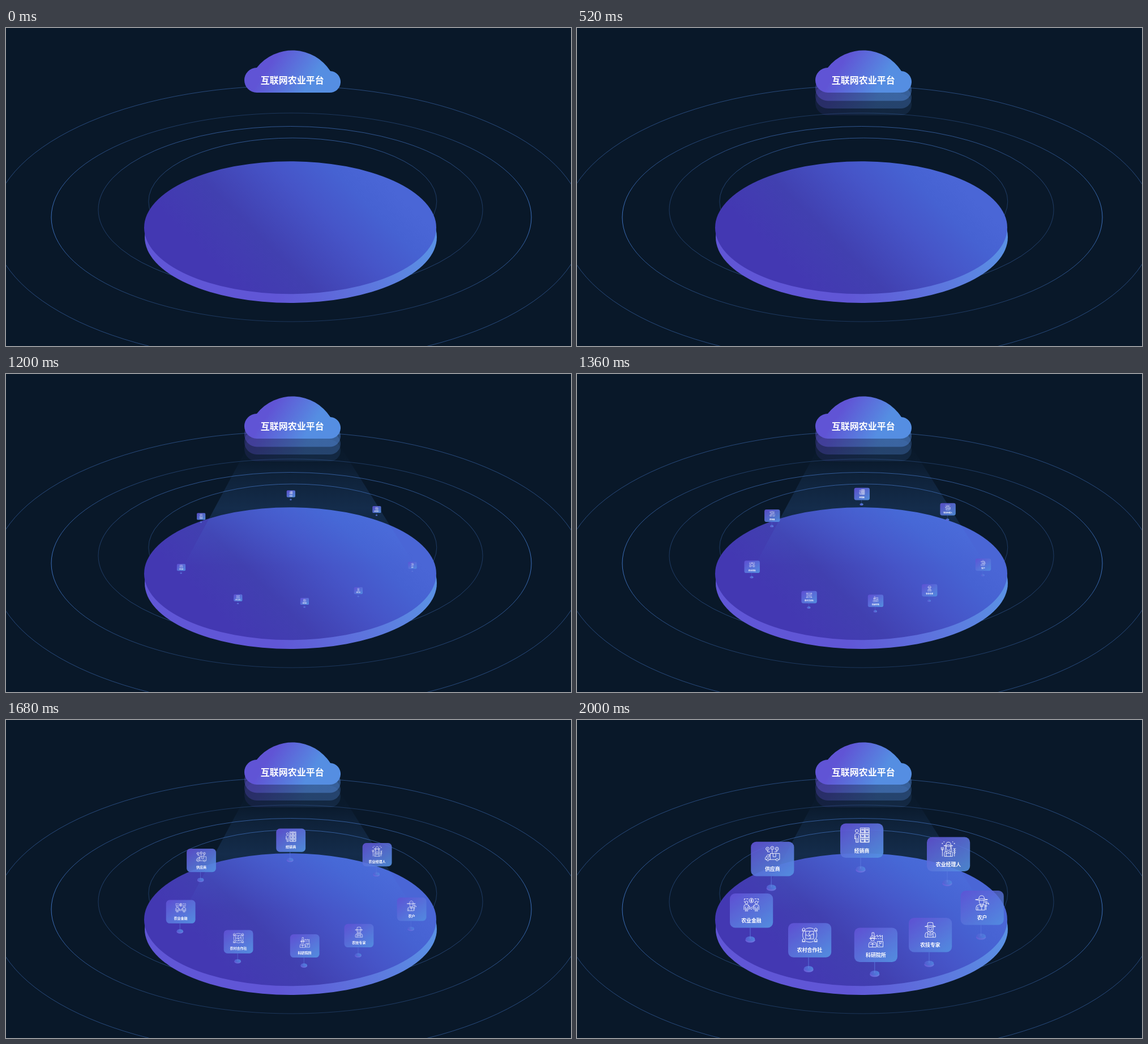
An HTML page for the animation above (2560 ms loop, 998x561 px).

```html
<!DOCTYPE html>
<html lang="zh-CN">
<head>
<meta charset="utf-8">
<title>互联网农业平台</title>
<style>
  html, body { margin: 0; width: 100%; height: 100%; overflow: hidden; background: #091829; }
  svg { display: block; width: 100%; height: 100%; }
  text { font-family: "Noto Sans CJK SC", "Noto Sans CJK", "Noto Sans", sans-serif; fill: #fff; text-anchor: middle; }
  .title { font-size: 16px; font-weight: 700; }
  .label { font-size: 8.9px; font-weight: 700; }
  .ring { fill: none; stroke-width: .8; }
  .icon { fill: none; stroke: #fff; stroke-width: .9; stroke-linecap: round; stroke-linejoin: round; }
</style>
</head>
<body>
<svg viewBox="0 0 998 561">
  <defs>
    <linearGradient id="top" gradientUnits="userSpaceOnUse" x1="402" y1="452" x2="627" y2="227">
      <stop offset="0" stop-color="#4338b2"/>
      <stop offset=".29" stop-color="#4140b0"/>
      <stop offset=".62" stop-color="#4655c8"/>
      <stop offset=".84" stop-color="#4662d2"/>
      <stop offset="1" stop-color="#4a66d6"/>
    </linearGradient>
    <linearGradient id="side" gradientUnits="userSpaceOnUse" x1="480" y1="480" x2="740" y2="370">
      <stop offset="0" stop-color="#6056d6"/>
      <stop offset="1" stop-color="#5a90e4"/>
    </linearGradient>
    <linearGradient id="sky" gradientUnits="userSpaceOnUse" x1="475" y1="50" x2="540" y2="92">
      <stop offset="0" stop-color="#6054d5"/>
      <stop offset="1" stop-color="#558ee2"/>
    </linearGradient>
    <linearGradient id="beamFill" gradientUnits="userSpaceOnUse" x1="0" y1="120" x2="0" y2="340">
      <stop offset="0" stop-color="#4a8ef0" stop-opacity="0"/>
      <stop offset=".15" stop-color="#4a8ef0" stop-opacity=".02"/>
      <stop offset=".27" stop-color="#4a8ef0" stop-opacity=".08"/>
      <stop offset=".53" stop-color="#4a8ef0" stop-opacity=".17"/>
      <stop offset="1" stop-color="#4a8ef0" stop-opacity="0"/>
    </linearGradient>
    <linearGradient id="card" x1=".1" y1=".05" x2=".9" y2=".95">
      <stop offset="0" stop-color="#6055d6"/>
      <stop offset="1" stop-color="#5590e2"/>
    </linearGradient>
    <linearGradient id="pinSide">
      <stop offset="0" stop-color="#6a5fdc"/>
      <stop offset="1" stop-color="#6a80e4"/>
    </linearGradient>
    <linearGradient id="pinTop">
      <stop offset="0" stop-color="#5560d4"/>
      <stop offset="1" stop-color="#5088e0"/>
    </linearGradient>
    <linearGradient id="ringTop" x2="0" y2="1">
      <stop offset="0" stop-color="#4a80d8" stop-opacity=".75"/>
      <stop offset=".5" stop-color="#4a80d8" stop-opacity=".4"/>
      <stop offset="1" stop-color="#4a80d8" stop-opacity=".55"/>
    </linearGradient>
    <linearGradient id="ringMid" x2="0" y2="1">
      <stop offset="0" stop-color="#4a80d8" stop-opacity=".35"/>
      <stop offset=".5" stop-color="#4a88e4" stop-opacity="1"/>
      <stop offset="1" stop-color="#4a80d8" stop-opacity=".35"/>
    </linearGradient>
    <path id="cloud" d="M443 114A22 22 0 0 1 443 70A80 80 0 0 1 573 76A19 19 0 0 1 571 114Z" fill="url(#sky)"/>
  </defs>

  <rect width="998" height="561" fill="#091829"/>
  <ellipse class="ring" cx="498.5" cy="346" rx="522" ry="244" stroke="#4a80d8" stroke-opacity=".6"/>
  <ellipse class="ring" cx="504" cy="334" rx="424" ry="184" stroke="url(#ringMid)"/>
  <ellipse class="ring" cx="502.5" cy="320.5" rx="339.5" ry="147" stroke="url(#ringTop)"/>
  <ellipse class="ring" cx="506.3" cy="306" rx="254.5" ry="112" stroke="url(#ringTop)"/>

  <ellipse cx="503" cy="369" rx="258" ry="116" fill="url(#side)"/>
  <ellipse cx="502" cy="352.2" rx="258" ry="117" fill="url(#top)"/>
  <path id="beam" d="M426 130H592L724 340H313Z" fill="url(#beamFill)"/>

  <use id="low" href="#cloud" y="40" opacity=".12"/>
  <use id="mid" href="#cloud" y="28" opacity=".28"/>
  <use id="high" href="#cloud" y="14.5" opacity=".45"/>
  <use href="#cloud"/>
  <text class="title" x="505.7" y="98.2">互联网农业平台</text>
  <g id="cards"></g>
</svg>
<script>
const LOOP = 2560, STEP = 40, GROW_FROM = 1000, GROW_STEPS = 25;
const reveals = [['high', 200], ['mid', 360], ['low', 520], ['beam', 800]];

const circle = (x, y, r) => `M${x - r} ${y}a${r} ${r} 0 1 0 ${2 * r} 0a${r} ${r} 0 1 0 ${-2 * r} 0`;
const box = (x, y, w, h) => `M${x} ${y}h${w}v${h}h${-w}z`;
const house = (x, y) => `M${x - 3} ${y}l3 -2.4l3 2.4M${x - 2} ${y}v3h4v-3M${x - 3} ${y + 3}h6`;
const person = (x, y) => circle(x, y, 2.6) +
  `M${x - 4.5} ${y + 13}v-6q0 -3 3 -3h3q3 0 3 3v6M${x - 2} ${y + 16}v-8M${x + 2} ${y + 16}v-8M${x} ${y + 16}v-5`;
const parcel = (x, y) => box(x, y, 5.6, 5.6) + `M${x + 1.8} ${y}v2h2v-2`;

// Icons live in a 28 by 28 field.
const shelf = () => {
  let d = box(11.5, .5, 16, 26) + 'M11.5 9.2h16M11.5 17.9h16M19.5 .5v26';
  for (const y of [3, 11.7, 20.4]) d += parcel(12.8, y) + parcel(20.8, y);
  return d;
};
const icons = {
  dealer: circle(5, 6, 2.9) + shelf() +
    'M1 20v-6q0 -3.5 3.5 -3.5h3l4 2.5M8 14v12.5h-5v-12M5.5 19v7.5M1 20h2',
  truck: circle(5, 5, 3) + circle(13.5, 3.5, 3) + circle(22, 5, 3) +
    'M5 4v2M13.5 2.5v2M22 4v2M5 8v2.5h4M22 8v2.5h-4M13.5 6.5v6' +
    'M10 13.5h17v11h-2M10 13.5v11M10 16h-5l-3 4l-1 1v3.5h2M8 24.5h12M3 20h5v-4M15 13.5v6h5v-6' +
    circle(5.5, 24.8, 2.1) + circle(22.3, 24.8, 2.1),
  manager: 'M6 8q8 -3 16 0q-8 3 -16 0M9.5 7q0 -5.5 4.5 -5.5t4.5 5.5M10 9v3q0 4.5 4 4.5t4 -4.5v-3' +
    'M9 10l-1 7M19 10l1 7M6.5 27v-5q0 -4 4 -4.5l3.5 3l3.5 -3q4 .5 4 4.5v5zM10 18v4h8v-4M10 22v5M18 22v5' +
    'M3 27v-12M1 11v3q0 2 2 2t2 -2v-3M3 11v4M25 27v-14' +
    'M25 15l-2 -2M25 15l2 -2M25 18.5l-2 -2M25 18.5l2 -2M25 22l-2 -2M25 22l2 -2' +
    circle(3, 4, .6) + circle(25, 4, .6) + circle(6, 1, .3) + circle(22, 1, .3),
  farmer: 'M2 8.5q11 -3 22 0q-11 3.5 -22 0M8 7.2q0 -6 5 -6t5 6M8.8 10v2.5q0 4.5 4.2 4.5t4.2 -4.5v-2.5' +
    'M3 27v-4q0 -4 4 -4.8l3 -1.2l3 3l3 -3l3 1.2v8.8zM10 17.5l1 4l2 -1.5l2 1.5l1 -4M13 20v7M6 22v5' +
    'M21 27v-14M18.5 13q5 -3 8 4l-3 -1.5l-2.5 -.5M19 20h4',
  finance: circle(14, 5, 4) + 'M15.5 3.5q-3 -1 -3 .5t3 1.8q0 2 -3 .7M14 2.4v5.2' +
    person(5, 8.5) + person(23, 8.5) + 'M8 14l4.5 4l3 -1l4.5 -4M10.5 19l3.5 2l3.5 -3' +
    'M1 4v-2h2M5 2h3M20 2h3M25 2h2v2M1 6.5v1M27 6.5v1',
  coop: box(7, 7, 14, 14) + house(3, 3.5) + house(25, 3.5) + house(3, 23) + house(25, 23) +
    'M14 7v3q-2 0 -2 2t2 2v2q2 0 2 2t-2 1.5v1.5M7 14h2.5q.5 2 2 2t2.5 -2h3q.5 -2 2 -2t2 2' +
    'M7.5 2.5q6.5 -3 13 0M7.5 25.5q6.5 3 13 0M2.5 8q-3 6 0 12M25.5 8q3 6 0 12',
  research: circle(8, 13, 3.4) + 'M4 11.5q0 -4.5 4 -4.5t4 4.5zM2.5 11.5h11M1 27v-4q0 -4.5 4 -5l3 2.5l3 -2.5q4 .5 4 5v4z' +
    'M4 22h8M8 20.5v6.5M7 7v-6h3.5l1 7M12 9l5 -3.5v3.5l5 -3.5v3.5l4 -3v9M14 12h2M18 12h2M22 12h2' +
    box(17, 17, 10, 10) + 'M20.5 17v4h3v-4M19 24h2',
  expert: 'M4.5 8q9.5 3 19 0q-9.5 -3.5 -19 0M8.5 7l1 -6q4.5 -1 9 0l1 6M8.8 9.5v3q0 5 5.2 5t5.2 -5v-3' +
    'M11.5 11.5v.8M16.5 11.5v.8M11.5 14q2.5 2 5 0M4.5 27v-4q0 -4 4 -4.8l2.5 -1l3 2.3l3 -2.3l2.5 1q4 .8 4 4.8v4z' +
    'M9 18.5v8.5M19 18.5v8.5M9 21.5h10M11.5 24h5'
};

// label, icon, left, top, growth centre x and y, fill opacity
const table = [
  ['经销商', 'dealer', 465, 182.4, 503.4, 211, .92],
  ['供应商', 'truck', 307.2, 214.8, 344.5, 252.8, .9],
  ['农业经理人', 'manager', 618, 206.4, 654.6, 239.6, .88],
  ['农户', 'farmer', 677.6, 301, 718.5, 339.2, .78],
  ['农业金融', 'finance', 270, 306, 309.8, 342.3, .92],
  ['农村合作社', 'coop', 373, 358.2, 409.5, 396.4, .92],
  ['科研院所', 'research', 489.8, 366.5, 527.3, 402.1, .92],
  ['农技专家', 'expert', 586, 349, 622, 382.8, .85]
];

const el = id => document.getElementById(id);
const layer = el('cards');
layer.innerHTML = table.map(([label, icon, , , , , alpha]) => `<g>
  <g opacity="${alpha}">
    <path d="M36 60.5V80" stroke="#5a78de" stroke-width="1"/>
    <ellipse cx="36" cy="82.2" rx="8.6" ry="4.6" fill="url(#pinSide)"/>
    <ellipse cx="36" cy="80" rx="8.2" ry="4.3" fill="url(#pinTop)"/>
    <path d="M36 76V80" stroke="#6a8ae8" stroke-width="1"/>
    <rect width="76.2" height="60.6" rx="9.5" fill="url(#card)"/>
  </g>
  <path class="icon" transform="translate(24.5 7.6) scale(.97)" d="${icons[icon]}"/>
  <text class="label" x="38" y="51.2">${label}</text></g>`).join('');
const cards = [...layer.children];

function draw(t) {
  for (const [id, at] of reveals) el(id).style.display = t < at ? 'none' : '';
  const n = Math.min(GROW_STEPS, Math.floor((t - GROW_FROM) / STEP));
  layer.style.display = n < 1 ? 'none' : '';
  if (n < 1) return;
  const s = n / GROW_STEPS;
  table.forEach(([, , x, y, cx, cy], i) => {
    const px = cx + (x - cx) * s, py = cy + (y - cy) * s;
    cards[i].setAttribute('transform', `translate(${px} ${py}) scale(${s})`);
  });
}

const start = performance.now();
function tick() {
  draw((performance.now() - start) % LOOP);
  requestAnimationFrame(tick);
}
tick();
</script>
</body>
</html>
```
